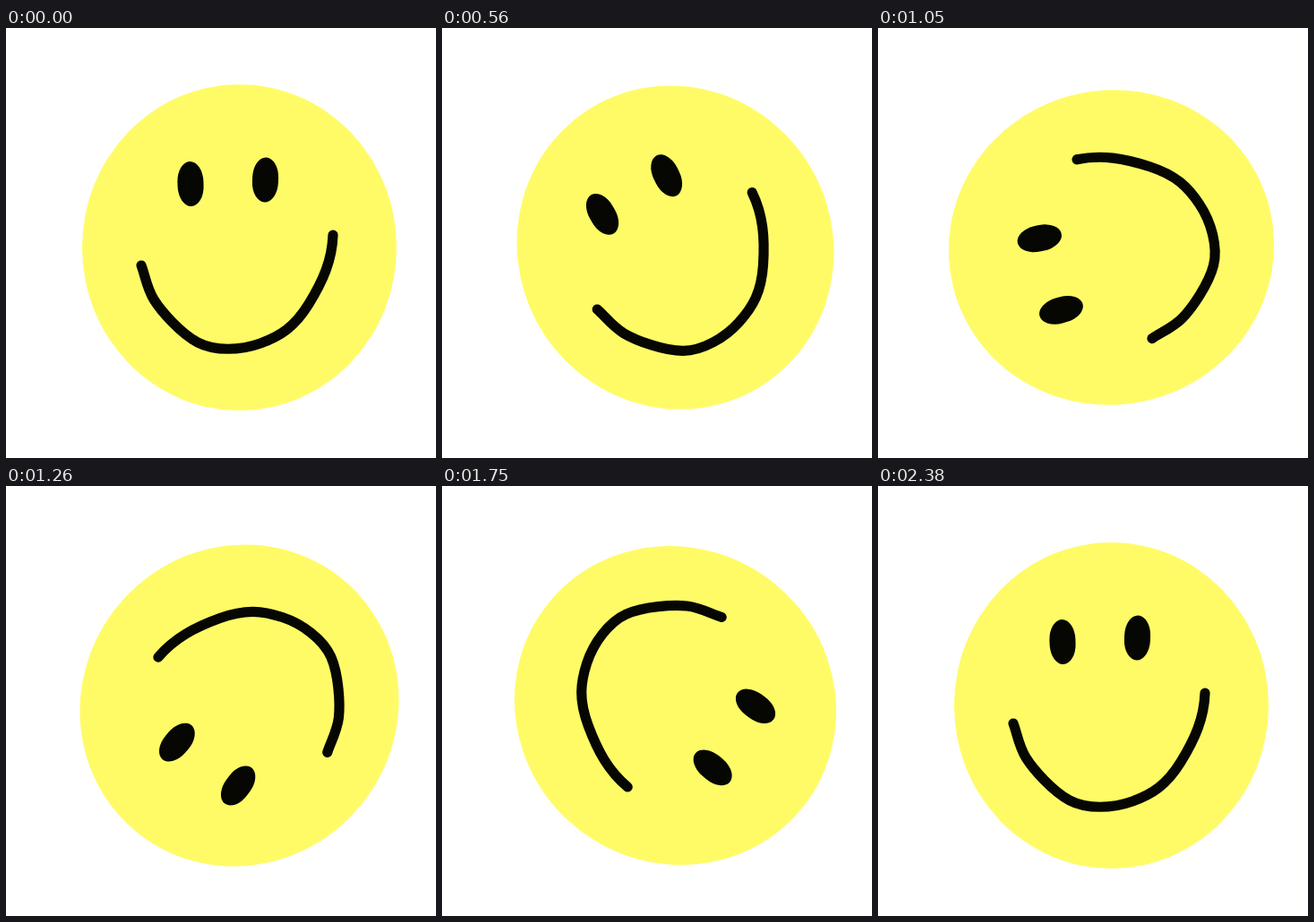
An HTML page for the animation above (2450 ms loop, 480x480 px).

```html
<!DOCTYPE html>
<html lang="en">
<head>
<meta charset="utf-8">
<title>Rolling smiley</title>
<style>
  html, body { margin: 0; width: 100%; height: 100%; overflow: hidden; background: #fff; }
  svg { display: block; width: 100%; height: 100%; }
</style>
</head>
<body>
<svg viewBox="0 0 480 480">
  <defs><rect id="eye" x="-14.5" y="-25" width="29" height="50" rx="14.5" ry="22.5"/></defs>
  <g id="face" fill="#060703">
    <ellipse cx="260.5" cy="245" rx="175.5" ry="182" fill="#fffb67"/>
    <use href="#eye" transform="translate(206 174) rotate(-2)"/>
    <use href="#eye" transform="translate(289.5 169.5) rotate(2)"/>
    <path d="M151 265C155 275 157 290 165 303S195 341 214 351 262 360 284 352 322 334 338 308 364 259 365 231"
      fill="none" stroke="#060703" stroke-width="11.2" stroke-linecap="round"/>
  </g>
</svg>
<script>
  const STEP = 70, STEPS = 35;
  const face = document.getElementById('face');

  // Key poses: [step, degrees turned]
  const poses = [[0, 0], [8, 28], [12, 67.8], [18, 141.6], [25, 232], [29, 296.1], [34, 360]];

  // Speed at a pose, taken from its neighbours; at rest at both ends
  function speed(i) {
    const before = poses[i - 1], after = poses[i + 1];
    return before && after ? (after[1] - before[1]) / (after[0] - before[0]) : 0;
  }

  // Smooth curve through the poses
  function turnAt(step) {
    const i = Math.max(1, poses.findIndex(pose => pose[0] >= step));
    const [x0, a0] = poses[i - 1], [x1, a1] = poses[i];
    const span = x1 - x0, s = (step - x0) / span, r = 1 - s;
    return a0 + (a1 - a0) * s * s * (3 - 2 * s) + span * s * r * (speed(i - 1) * r - speed(i) * s);
  }

  function draw() {
    const step = Math.floor(performance.now() / STEP) % STEPS;
    face.setAttribute('transform', `rotate(${-turnAt(step)} 260.5 245)`);
    requestAnimationFrame(draw);
  }
  draw();
</script>
</body>
</html>
```
